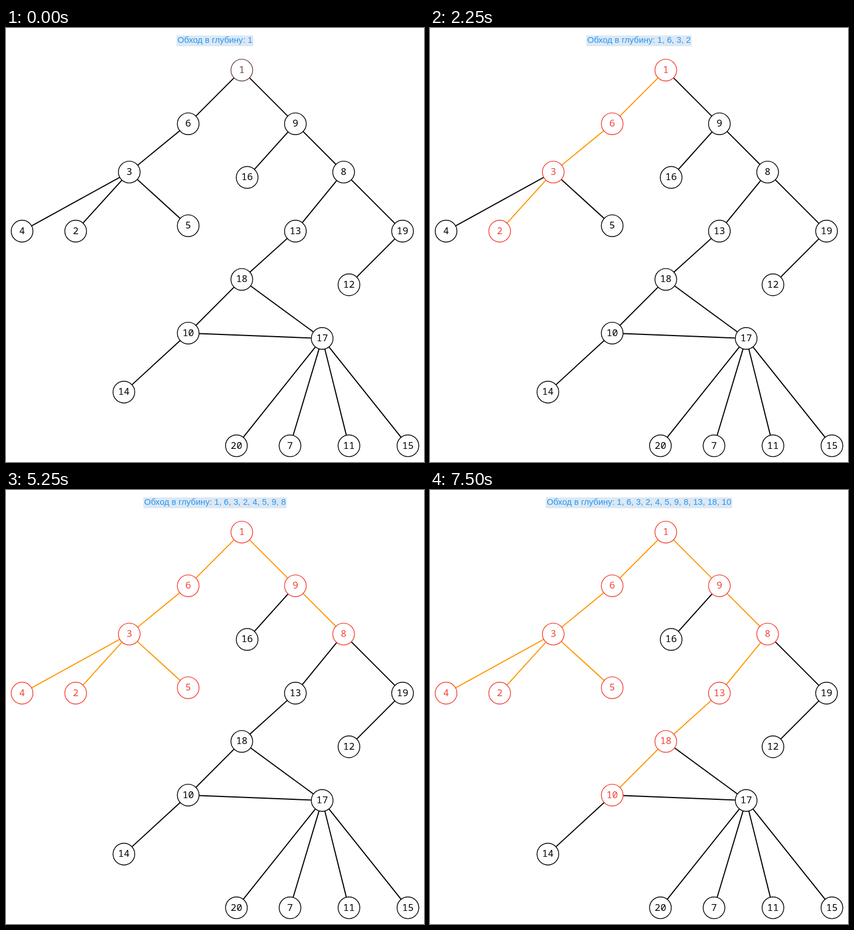
An HTML page for the animation above (8000 ms loop, 735 px wide and 762 px high).

```html
<!DOCTYPE html>
<html lang="ru">
<head>
<meta charset="utf-8">
<style>
  html, body { margin: 0; width: 100%; height: 100%; overflow: hidden; background: #fff; }
  svg { display: block; width: 735px; height: 762px; }
  line { stroke-width: 1.9; }
  circle { fill: #fff; stroke-width: 1.4; }
  #nodes text { font: 500 17px "Noto Sans Mono", monospace; text-anchor: middle; }
  #title { font: 15.08px "Liberation Sans", Arial, sans-serif; text-anchor: middle; fill: #2196f3; }
  #titleBox { fill: #dde8f3; }
</style>
</head>
<body>
<svg viewBox="0 0 735 762">
  <rect id="titleBox" y="13" height="19"/>
  <text id="title" x="367.5" y="26"></text>
  <g id="edges"></g>
  <g id="nodes"></g>
</svg>
<script>
const WIDTH = 735, GRID = WIDTH / 78, TOP = 73.95, RADIUS = 19.1;
const STEP = 750, LOOP = 8000;
const BLACK = '#000', RED = '#f44336', ORANGE = '#ff9800', START = '#6b4747';

const byId = id => document.getElementById(id);
const title = byId('title'), titleBox = byId('titleBox');
const nodes = new Map(), edges = [];

function add(parent, tag, attrs) {
  const el = document.createElementNS('http://www.w3.org/2000/svg', tag);
  for (const key in attrs) el.setAttribute(key, attrs[key]);
  return parent.appendChild(el);
}

function connect(a, b) {
  const el = add(byId('edges'), 'line', { x1: a.x, y1: a.y, x2: b.x, y2: b.y });
  edges.push({ a, b, el });
  a.neighbours.push(b);
  b.neighbours.push(a);
}

// A branch is a node, its offset from the parent in grid units, and its children.
const branch = (id, dx, dy, ...children) => ({ id, dx, dy, children });

function grow({ id, dx, dy, children }, parent) {
  const x = (parent ? parent.x : 0) + dx * GRID;
  const y = (parent ? parent.y : TOP) + dy * GRID;
  const circle = add(byId('nodes'), 'circle', { cx: x, cy: y, r: RADIUS });
  const label = add(byId('nodes'), 'text', { x, y: y + 5 });
  label.textContent = id;
  const node = { id, x, y, circle, label, neighbours: [] };
  nodes.set(id, node);
  if (parent) connect(parent, node);
  children.forEach(child => grow(child, node));
}

grow(branch(1, 44, 0,
  branch(6, -10, 10,
    branch(3, -11, 9,
      branch(4, -20, 11), branch(2, -10, 11), branch(5, 11, 10))),
  branch(9, 10, 10,
    branch(16, -9, 10),
    branch(8, 9, 9,
      branch(13, -9, 11,
        branch(18, -10, 9,
          branch(10, -10, 10, branch(14, -12, 11)),
          branch(17, 15, 11,
            branch(20, -16, 20), branch(7, -6, 20), branch(11, 5, 20), branch(15, 16, 20)))),
      branch(19, 11, 11, branch(12, -10, 10))))));
connect(nodes.get(10), nodes.get(17));

// Depth-first search, smallest neighbour first.
function visit(node, order = []) {
  order.push(node);
  for (const next of [...node.neighbours].sort((a, b) => a.id - b.id))
    if (!order.includes(next)) visit(next, order);
  return order;
}
const order = visit(nodes.get(1));

function show(step) {
  const visited = order.slice(0, step + 1);
  const seen = node => visited.includes(node);
  for (const node of nodes.values()) {
    const color = !seen(node) ? BLACK : step ? RED : START;
    node.circle.style.stroke = node.label.style.fill = color;
  }
  for (const { a, b, el } of edges)
    el.style.stroke = seen(a) && seen(b) ? ORANGE : BLACK;

  title.textContent = 'Обход в глубину: ' + visited.map(node => node.id).join(', ');
  const width = title.getComputedTextLength() + 3;
  titleBox.setAttribute('x', (WIDTH - width) / 2);
  titleBox.setAttribute('width', width);
}

const begin = performance.now();
let shown = -1;
function tick() {
  const step = Math.floor((performance.now() - begin) % LOOP / STEP);
  if (step !== shown) show(shown = step);
  requestAnimationFrame(tick);
}
tick();
</script>
</body>
</html>
```
